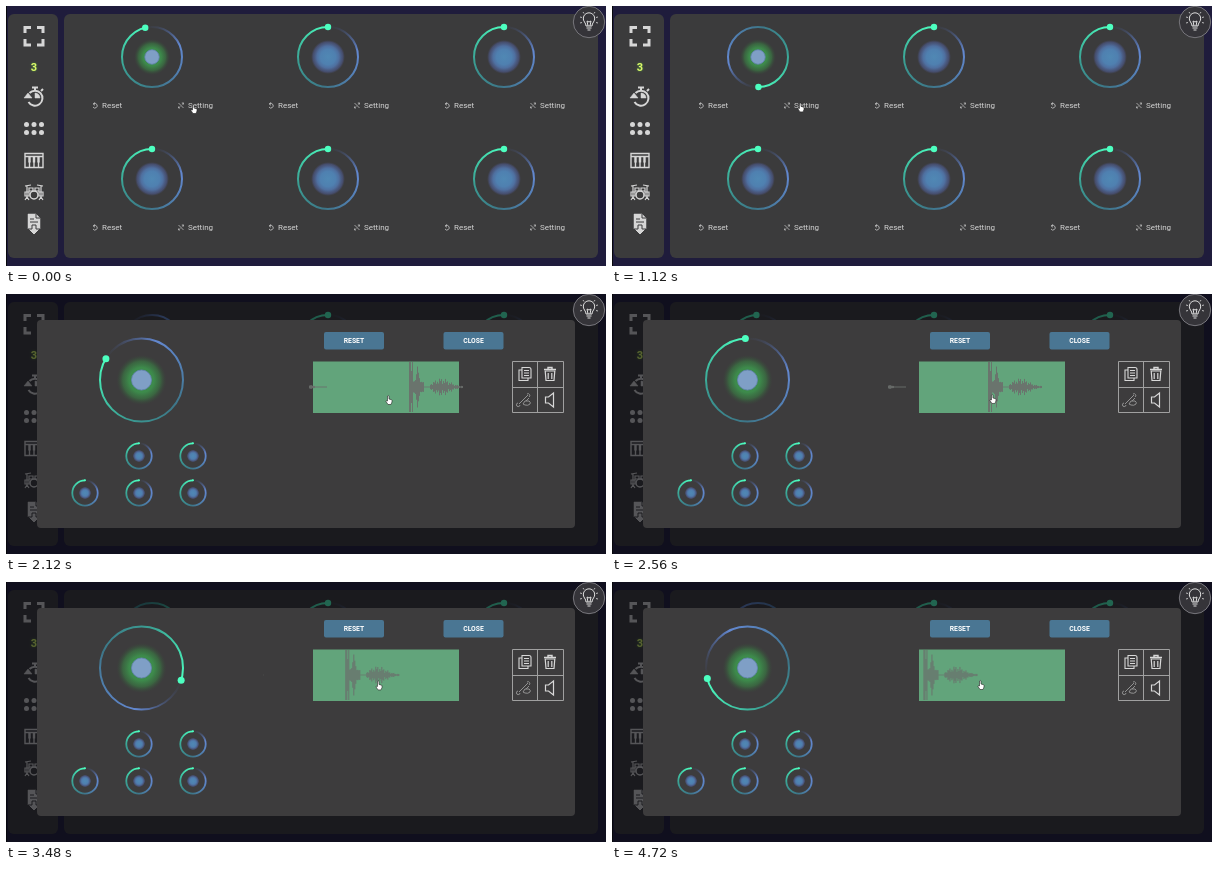
An HTML page with a canvas for the animation above (4.76 s loop, 600x260 px).

```html
<!DOCTYPE html>
<html>
<head>
<meta charset="utf-8">
<style>
html, body { margin: 0; width: 100%; height: 100%; overflow: hidden; background: #1f1c3c; }
canvas { display: block; width: 600px; height: 260px; }
</style>
</head>
<body>
<canvas id="stage" width="600" height="260"></canvas>
<script>
const LOOP = 4760, STEP = 40, TAU = Math.PI * 2;
const ctx = document.getElementById('stage').getContext('2d');

// Linear interpolation through [time, value] points
function track(t, points) {
  if (t <= points[0][0]) return points[0][1];
  for (let i = 1; i < points.length; i++) {
    const [t0, v0] = points[i - 1], [t1, v1] = points[i];
    if (t <= t1) return v0 + (v1 - v0) * (t - t0) / (t1 - t0);
  }
  return points[points.length - 1][1];
}

const ANGLE = [[0, -13], [680, 122.5], [1320, 205], [2120, 301], [2960, 408], [4040, 531], [4720, 615.5]];
const SCROLL = [[2280, 0], [2800, -50], [2960, -53.5], [3360, -56], [3880, -89], [4040, -90], [4440, -91.5]];
const CURSOR_X = [[0, 188], [600, 189], [1640, 189], [1760, 215], [2000, 365], [2120, 383], [2280, 383], [2960, 378], [3900, 369]];
const CURSOR_Y = [[0, 103], [500, 99], [1000, 99], [1200, 103], [1640, 103], [2120, 106], [2960, 104], [3900, 103]];

function box(x, y, w, h, r, fill) {
  ctx.fillStyle = fill;
  ctx.beginPath();
  ctx.roundRect(x, y, w, h, r);
  ctx.fill();
}

function disc(x, y, r, fill) {
  ctx.fillStyle = fill;
  ctx.beginPath();
  ctx.arc(x, y, r, 0, TAU);
  ctx.fill();
}

function line(d, color, width = 1, fill) {
  const path = new Path2D(d);
  if (fill) { ctx.fillStyle = fill; ctx.fill(path); }
  ctx.strokeStyle = color;
  ctx.lineWidth = width;
  ctx.stroke(path);
}

function icon(x, y, draw) {
  ctx.save();
  ctx.translate(x, y);
  draw();
  ctx.restore();
}

function label(text, x, y, font, color, align = 'left') {
  ctx.font = font + ' Roboto, sans-serif';
  ctx.textAlign = align;
  ctx.fillStyle = color;
  ctx.fillText(text, x, y);
}

function glow(x, y, r, stops) {
  const g = ctx.createRadialGradient(x, y, 0, x, y, r);
  stops.forEach(([at, color]) => g.addColorStop(at, color));
  disc(x, y, r, g);
}

function ring(x, y, r, degrees, width, dot) {
  const start = (degrees - 90) * Math.PI / 180;
  const g = ctx.createConicGradient(start, x, y);
  g.addColorStop(0, 'rgba(70,85,130,0)');
  g.addColorStop(0.07, 'rgba(76,96,150,.25)');
  g.addColorStop(0.22, '#6388d0');
  g.addColorStop(0.34, '#5580b8');
  g.addColorStop(0.52, '#3d7688');
  g.addColorStop(0.72, '#3a9c92');
  g.addColorStop(0.88, '#43d6ac');
  g.addColorStop(1, '#4dffc0');
  ctx.strokeStyle = g;
  ctx.lineWidth = width;
  ctx.beginPath();
  ctx.arc(x, y, r, 0, TAU);
  ctx.stroke();
  if (dot) disc(x + r * Math.cos(start), y + r * Math.sin(start), dot, '#4dffc0');
}

function idleCore(x, y, r) {
  glow(x, y, r, [[0, '#5088b4'], [0.45, '#4f80b0'], [0.65, '#4f6f9f'], [0.88, 'rgba(76,88,135,.65)'], [1, 'rgba(70,75,110,0)']]);
}

function activeCore(x, y, r, core) {
  glow(x, y, r, [[0, '#3f9150'], [0.5, '#3d8a4b'], [0.75, 'rgba(58,112,66,.8)'], [1, 'rgba(55,75,58,0)']]);
  disc(x, y, core, '#7f9fc6');
  ctx.strokeStyle = '#6684b4';
  ctx.lineWidth = 0.8;
  ctx.stroke();
}

function sidebar() {
  const c = '#d6d6d6';
  box(2, 8, 50, 244, 6, '#3b3b3c');
  line('M19 27V21.5H25 M31 21.5H37V27 M37 33V39H31 M25 39H19V33', c, 3);
  ctx.shadowColor = '#4c9a3a';
  ctx.shadowBlur = 2;
  label('3', 28, 65, 'bold 11px', '#dcf56a', 'center');
  ctx.shadowBlur = 0;
  icon(29, 92, () => {
    line('M-5.5 -5A7.5 7.5 0 1 1 -6.5 4 M0 -7.5V-10 M-3 -10.5H3 M6 -7L8 -9', c, 2);
    line('M0 -5A5 5 0 0 1 5 0H0Z', c, 0.5, c);
    line('M-11 0H-3L-7 -5Z', c, 0.5, c);
  });
  for (let i = 0; i < 6; i++) disc(20.5 + i % 3 * 7.5, 118.5 + (i > 2) * 8, 2.5, c);
  icon(28, 154.5, () => {
    line('M-9 -7H9V7H-9Z M-9 -4H9 M-4.5 1V7 M0 1V7 M4.5 1V7', c, 1.4);
    line('M-4.5 -4V2 M0 -4V2 M4.5 -4V2', c, 2.4);
  });
  icon(28, 186, () => {
    line('M-9 -6L-3 -7 M3 -7L9 -6 M-7 -6V7 M7 -6V7 M-9 8L-7 5L-5 8 M5 8L7 5L9 8 M-5 -4H-1V-1H-5Z M1 -4H5V-1H1Z M-9 0H-5V4H-9Z M5 0H9V4H5Z', c, 1.2);
    ctx.beginPath();
    ctx.arc(0, 3, 4, 0, TAU);
    ctx.lineWidth = 1.5;
    ctx.stroke();
  });
  icon(28, 217, () => {
    line('M-6 -9H2L6 -5V6H-6Z', c, 0.5, c);
    line('M2 -9V-5H6 M-4 -4H0 M-4 -1H4', '#3b3b3c', 1);
    line('M-2 2H2V6H6L0 12L-6 6H-2Z', '#3b3b3c', 1, c);
  });
}

function pad(x, y, angle, active) {
  ring(x, y, 30, angle, 2, 3.2);
  if (active) activeCore(x, y, 18, 7.2);
  else idleCore(x, y, 17);
  label('Reset', x - 50, y + 51, '8px', '#d4d4d4');
  label('Setting', x + 36, y + 51, '8px', '#d4d4d4');
  icon(x - 57, y + 48.5, () => line('M-1.5 -1.6A2.3 2.3 0 1 1 -2 1.5 M0 -3L-1.8 -1.6L0 -.2', '#ccc', 0.8));
  icon(x + 29, y + 48.5, () => line('M-2.5 -2.5L2.5 2.5 M-2.5 2.5L-.8 .8 M.8 -.8L2.5 -2.5 M.8 -2.5H2.5V-1 M-2.5 1V2.5H-1', '#bbb', 0.8));
}

function home(angle) {
  ctx.fillStyle = '#1f1c3c';
  ctx.fillRect(0, 0, 600, 260);
  ctx.fillStyle = '#08080c';
  ctx.fillRect(0, 0, 1, 260);
  sidebar();
  box(58, 8, 534, 244, 6, '#3b3b3c');
  for (let i = 0; i < 6; i++) {
    pad(146 + i % 3 * 176, i < 3 ? 51 : 173, i ? 0 : angle, i === 0);
  }
}

function button(text, x) {
  box(x, 38, 60, 17.5, 2, '#4a7693');
  label(text, x + 30, 49.3, 'bold 6.8px', '#fff', 'center');
}

// Half height of the sound at offset x from its beginning
function loudness(x) {
  const jitter = 0.65 + 0.35 * Math.sin(x * 5.3) * Math.cos(x * 2.1);
  if (x < 6) return 2.2 * jitter;
  if (x < 18) return 0.5;
  if (x < 100) return 0;
  if (x < 104) return x === 102 ? 16 : 25;
  if (x < 115) return (23 * Math.exp(-Math.abs(x - 108) / 3.2) + 2) * jitter;
  if (x < 121) return 0.4;
  if (x < 154) return (1.2 + 8 * Math.exp(-(((x - 132) / 11) ** 2))) * jitter;
  return 0;
}

function waveform(shift) {
  ctx.fillStyle = '#62a47b';
  ctx.fillRect(307, 67.5, 146, 51.5);
  ctx.save();
  ctx.beginPath();
  ctx.rect(257, 66, 203, 54);
  ctx.clip();
  ctx.fillStyle = '#6b6f6d';
  for (let x = 0; x < 154; x++) {
    const h = loudness(x);
    if (h) ctx.fillRect(303 + x + shift, 93 - h, 0.9, 2 * h);
  }
  ctx.restore();
}

function tools() {
  const c = '#d8d8d8';
  line('M506.5 67.5H557.5V118.5H506.5Z M506.5 93.5H557.5 M531.5 67.5V118.5', '#a0a0a0', 1);
  icon(519, 80, () => line('M-3 -6.5H4Q6 -6.5 6 -4.5V4H-3Z M-3 -4H-6V6.5H3V4 M-1 -3.5H4 M-1 -1H4 M-1 1.5H4', c, 1.1));
  icon(544, 80, () => {
    line('M-6 -4.5H6 M-2 -4.5V-6.5H2V-4.5', c, 1.4);
    line('M-4.8 -3L-4 6.5H4L4.8 -3Z M-1.8 -1V5 M1.8 -1V5', c, 1.2);
  });
  icon(519, 106, () => line('M-6 4L-1 -1L3 -5 M-7 3A1.8 1.8 0 1 0 -5 5 M2 -6A1.8 1.8 0 1 1 4 -3 M-2 4L0 1H4Q6 2 5 4Q3 6 0 5Z M1 1L4 -2', '#929292', 1));
  icon(544, 106, () => line('M-4.5 -3H-1.5L3.5 -7V7L-1.5 3H-4.5Z', c, 1.2));
}

function dialog(angle, shift) {
  box(31, 26, 538, 208, 4, '#3d3c3d');
  ring(135.5, 86, 41.5, angle, 2, 3.5);
  activeCore(135.5, 86, 25, 10);
  for (const [x, y] of [[133, 162], [187, 162], [79, 199], [133, 199], [187, 199]]) {
    ring(x, y, 12.7, 0, 1.8, 1);
    idleCore(x, y, 6.2);
  }
  button('RESET', 318);
  button('CLOSE', 437.5);
  waveform(shift);
  tools();
}

function lamp() {
  disc(583, 16, 15.7, '#353439');
  ctx.strokeStyle = '#77767c';
  ctx.lineWidth = 1;
  ctx.stroke();
  icon(583, 16, () => {
    line('M-3 4Q-3 2 -4.5 0A5.7 5.7 0 1 1 4.5 0Q3 2 3 4Z M-2.5 6H2.5 M-1.5 8H1.5 M-1 4L-2 -1L0 0L2 -1L1 4', '#dedede', 1);
    line('M-9 -5L-7 -4.5 M9 -5L7 -4.5 M-9 1L-7 .5 M9 1L7 .5 M-6 -10L-5 -8.5 M6 -10L5 -8.5', '#dedede', 0.8);
  });
}

function cursor(x, y, pointing) {
  icon(x, y, () => line(pointing
    ? 'M-1.5 -4Q-.7 -5 0 -4V-1L2.5 -.3Q3.3 0 3 2L2 4.5H-1L-3 1.5Q-3 .2 -1.5 1Z'
    : 'M0 -4V2.6L1.4 1.4L2.4 3.4L3.3 3L2.4 1H4.2Z', '#222', 0.6, '#fff'));
}

function draw(t) {
  const angle = track(t, ANGLE);
  const open = track(t, [[1160, 0], [1280, 1]]);
  home(angle);
  if (open) {
    ctx.globalAlpha = open;
    ctx.fillStyle = 'rgba(8,8,12,.62)';
    ctx.fillRect(0, 0, 600, 260);
    dialog(angle, track(t, SCROLL));
    ctx.globalAlpha = 1;
  }
  lamp();
  cursor(track(t, CURSOR_X), track(t, CURSOR_Y), t < 400 || t >= 1080);
}

function tick() {
  const t = performance.now() % LOOP;
  draw(Math.floor(t / STEP) * STEP);
  requestAnimationFrame(tick);
}
tick();
</script>
</body>
</html>
```
